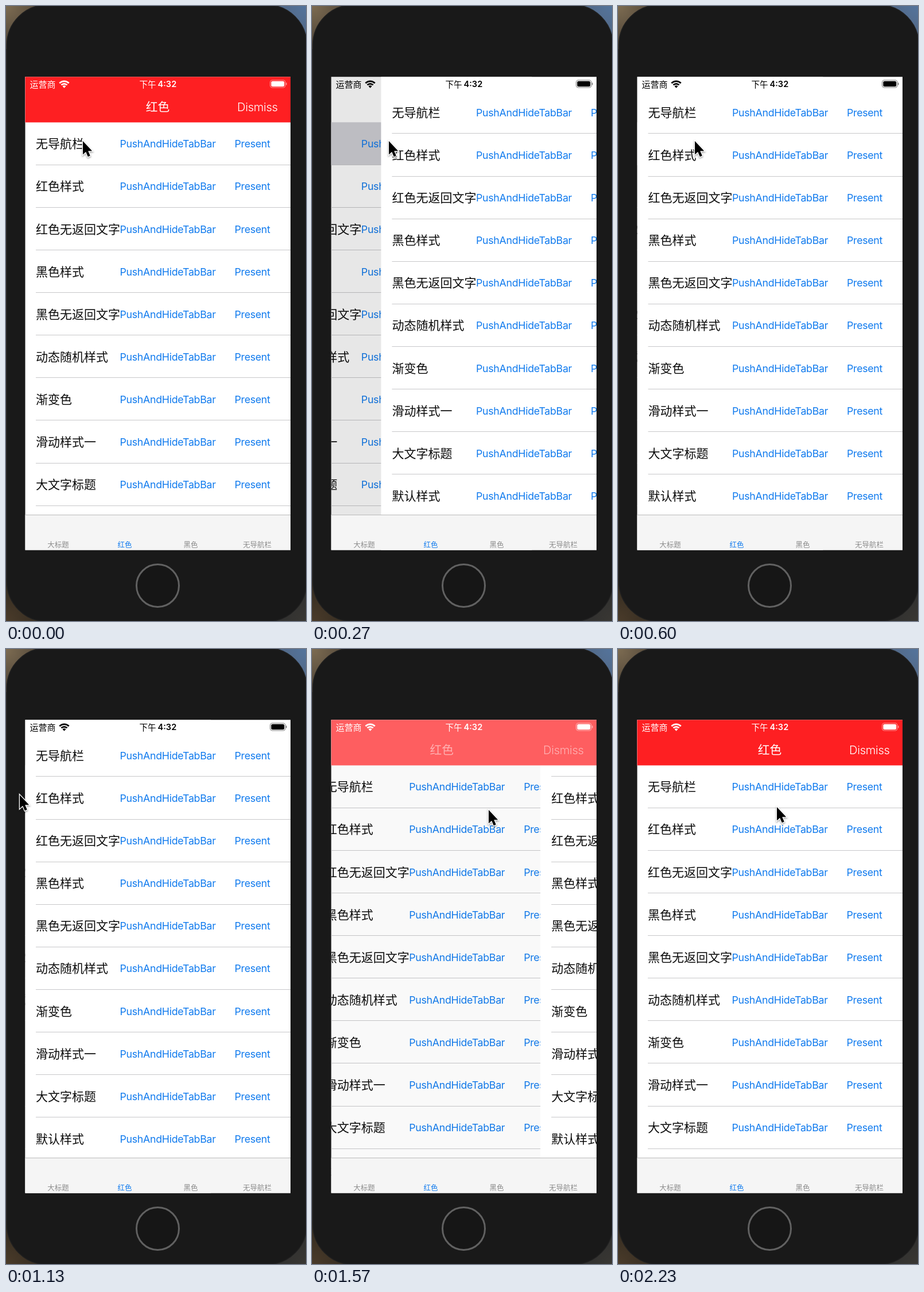
An HTML page with a canvas that plays this animation: 523x1070 px, repeating every 2.26 s.

```html
<!DOCTYPE html>
<html lang="zh-CN">
<head>
<meta charset="utf-8">
<style>
html, body { margin: 0; width: 100%; height: 100%; overflow: hidden; background: #191919; }
canvas { display: block; }
</style>
</head>
<body>
<canvas id="stage" width="523" height="1070"></canvas>
<script>
const ctx = document.getElementById('stage').getContext('2d');
const LOOP = 2260, LEFT = 33, TOP = 123, WIDTH = 463, HEIGHT = 824, ROW = 74.1;
const PUSH = 105, DRAG = 1170, RELEASE = 1488;
const CJK = '"Noto Sans CJK SC", "Noto Sans CJK", sans-serif';
const LATIN = 'Inter, Roboto, sans-serif';
const BLUE = '#117bee', RED = '#fe1f22';
const rows = ['无导航栏', '红色样式', '红色无返回文字', '黑色样式', '黑色无返回文字',
  '动态随机样式', '渐变色', '滑动样式一', '大文字标题', '默认样式'];
const tabs = [['大标题', 91], ['红色', 207], ['黑色', 322], ['无导航栏', 438]];

const clamp = x => Math.min(1, Math.max(0, x));
const ease = x => { x = clamp(x); return x * x * (3 - 2 * x); };
const mix = (a, b, k) => a + (b - a) * k;
const dragged = t => ease((t - DRAG) / (RELEASE - DRAG));

// Remaining distance of a critically damped spring
function rest(ms) {
  const x = Math.max(0, ms) * 0.0185;
  return (1 + x) * Math.exp(-x);
}

function rect(x, y, w, h, color) {
  ctx.fillStyle = color;
  ctx.fillRect(x, y, w, h);
}

function roundRect(x, y, w, h, r) {
  ctx.beginPath();
  ctx.roundRect(x, y, w, h, r);
}

function text(str, x, y, font, color, align = 'left', spacing = 0) {
  ctx.font = font;
  ctx.fillStyle = color;
  ctx.textAlign = align;
  ctx.letterSpacing = spacing + 'px';
  ctx.fillText(str, x, y);
}

function corner(x, y, inner, outer) {
  const g = ctx.createRadialGradient(x, y, 0, x, y, 75);
  g.addColorStop(0, inner);
  g.addColorStop(1, outer);
  rect(x - 75, y - 75, 150, 150, g);
}

function drawPhone() {
  rect(0, 0, 523, 1070, '#302c28');
  corner(0, 0, '#7d6c52', '#4a4035');
  corner(523, 0, '#54749c', '#52627a');
  corner(0, 1070, '#4a3b2a', '#30291f');
  corner(523, 1070, '#393733', '#2b2c2d');
  roundRect(1.5, -2, 523, 1073, 70);
  ctx.fillStyle = '#191919';
  ctx.fill();
  ctx.strokeStyle = '#202020';
  ctx.lineWidth = 1.5;
  ctx.stroke();
  ctx.beginPath();
  ctx.arc(264.5, 1008.5, 37, 0, 7);
  ctx.fillStyle = '#161616';
  ctx.fill();
  ctx.strokeStyle = '#616161';
  ctx.lineWidth = 3;
  ctx.stroke();
}

function drawPage(x, center, highlight) {
  rect(x, TOP, WIDTH, HEIGHT, '#fff');
  if (highlight > 0) {
    ctx.globalAlpha = highlight;
    rect(x, center - 37.5, WIDTH, ROW, '#d1d1d6');
    ctx.globalAlpha = 1;
  }
  rows.forEach((name, i) => {
    const y = center + i * ROW;
    text(name, x + 19, y + 7.5, '21px ' + CJK, '#0a0a0a');
    text('PushAndHideTabBar', x + 165.5, y + 6.5, '17.8px ' + LATIN, BLUE, 'left', -0.3);
    text('Present', x + 365.5, y + 6.5, '17.8px ' + LATIN, BLUE, 'left', -0.3);
    rect(x + 19, Math.round(y + 36), WIDTH - 19, 1, '#c8c8ca');
  });
}

function drawBar(alpha, shift) {
  ctx.globalAlpha = clamp(alpha * 3);
  rect(LEFT, TOP, WIDTH, 79.5, '#fff');
  ctx.globalAlpha = alpha;
  rect(LEFT, TOP, WIDTH, 79.5, RED);
  ctx.globalAlpha = alpha ** 2;
  text('红色', 264.5 - shift, 182.5, '500 20.7px ' + CJK, '#fff', 'center');
  text('Dismiss', 403, 182.5, '300 20.2px ' + LATIN, '#fff', 'left', -0.3);
  ctx.globalAlpha = 1;
}

function drawStatus(color) {
  text('运营商', 41.5, 141.5, '15px ' + CJK, color);
  text('下午', 232.5, 141.5, '500 14.6px ' + CJK, color);
  text('4:32', 264.5, 141, '600 14.6px ' + LATIN, color);

  ctx.strokeStyle = ctx.fillStyle = color;
  ctx.lineWidth = 2.7;
  for (const r of [7.2, 11.6]) {
    ctx.beginPath();
    ctx.arc(101.5, 142.5, r, -Math.PI * 0.75, -Math.PI * 0.25);
    ctx.stroke();
  }
  ctx.beginPath();
  ctx.moveTo(101.5, 142.8);
  ctx.arc(101.5, 142.5, 4.2, -Math.PI * 0.75, -Math.PI * 0.25);
  ctx.fill();

  ctx.globalAlpha = 0.5;
  ctx.lineWidth = 1.1;
  roundRect(460.5, 129, 26.5, 13, 4);
  ctx.stroke();
  rect(488, 133.5, 1.5, 4, color);
  ctx.globalAlpha = 1;
  roundRect(462.3, 130.8, 22.9, 9.4, 2.5);
  ctx.fill();
}

function drawTabs() {
  rect(LEFT, 885, WIDTH, 62, '#f5f5f5');
  rect(LEFT, 885, WIDTH, 1, '#bababa');
  tabs.forEach(([name, x], i) =>
    text(name, x, 941.8, '500 12.5px ' + CJK, i === 1 ? BLUE : '#8b8b8b', 'center'));
}

function drawCursor(x, y) {
  ctx.save();
  ctx.translate(x + 1, y + 1);
  ctx.beginPath();
  [[0, 0], [0, 23.5], [5.2, 18.8], [8.8, 27.3], [12.8, 25.6], [9.2, 17.2], [16.2, 17.2]]
    .forEach(([a, b]) => ctx.lineTo(a, b));
  ctx.closePath();
  ctx.shadowColor = 'rgba(0,0,0,.4)';
  ctx.shadowBlur = 3;
  ctx.shadowOffsetY = 1.5;
  ctx.strokeStyle = '#fff';
  ctx.lineWidth = 2.6;
  ctx.stroke();
  ctx.shadowColor = 'transparent';
  ctx.fillStyle = '#000';
  ctx.fill();
  ctx.restore();
}

function cursorAt(t) {
  if (t < 1150) {
    const k = ease((t - 680) / 400);
    return [mix(133, 23, k), mix(234, 253, k)];
  }
  if (t < 2080) {
    const k = dragged(t);
    return [mix(23, 307, k), mix(253, 279, k)];
  }
  const k = clamp((t - 2080) / 150) ** 2;
  return [mix(307, 276, k), mix(279, 274, k)];
}

// 0: red page on top, 1: page without a bar fully pushed
function pushAmount(t) {
  if (t < 1150) return 1 - rest(t - PUSH);
  if (t < RELEASE) return 1 - 0.613 * dragged(t);
  const p = 0.387 * rest(t - RELEASE);
  return p < 0.001 ? 0 : p;
}

function draw(t) {
  const p = pushAmount(t), pushing = t < 1150;
  const bar = pushing ? clamp(1 - 1.3 * p) : (1 - p) ** 1.4;
  const highlight = pushing ? clamp((t - 50) / 30) : clamp(2 * p - 1);

  drawPhone();
  ctx.save();
  ctx.beginPath();
  ctx.rect(LEFT + 0.5, TOP + 0.3, WIDTH - 0.5, HEIGHT - 0.8);
  ctx.clip();
  drawPage(LEFT - 0.3 * WIDTH * p, 239.8, highlight);
  rect(LEFT, TOP, WIDTH, HEIGHT, `rgba(0,0,0,${0.115 * p})`);
  if (p > 0) drawPage(LEFT + WIDTH * (1 - p), 185.4, 0);
  if (bar > 0) drawBar(bar, 181 * p);
  drawStatus(bar > 0.35 ? '#fff' : '#000');
  drawTabs();
  ctx.restore();
  drawCursor(...cursorAt(t));
}

const start = performance.now();
function tick() {
  draw((performance.now() - start) % LOOP);
  requestAnimationFrame(tick);
}
tick();
</script>
</body>
</html>
```
